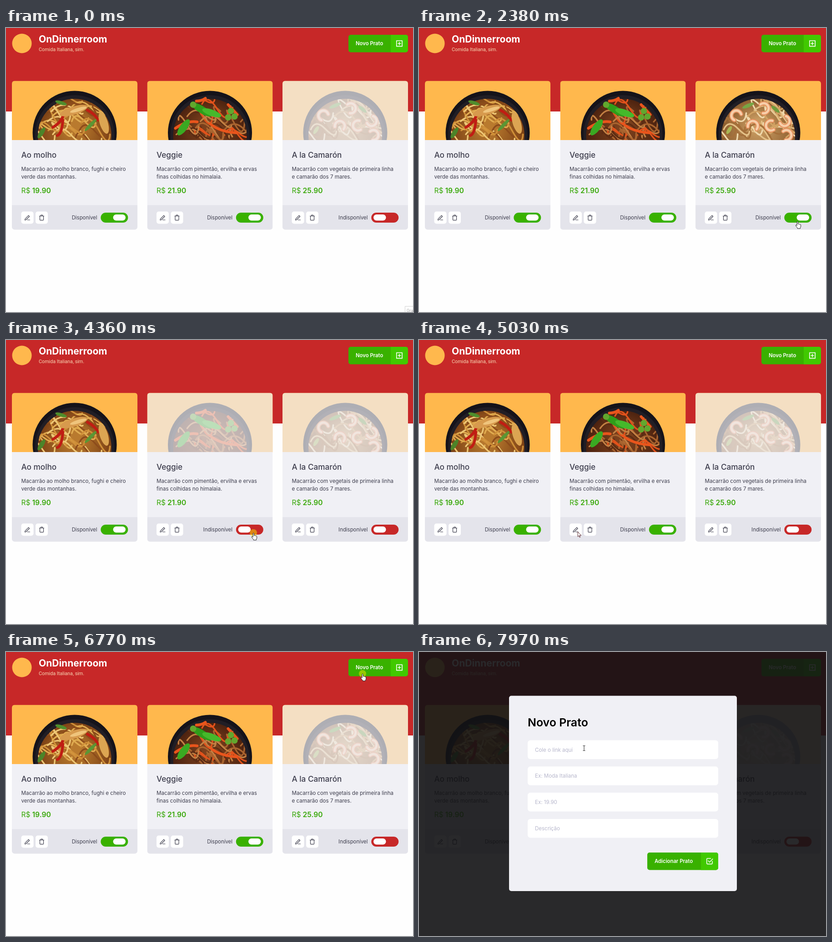
An HTML page with a canvas for the animation above (8 s loop, 895 px wide and 626 px high).

```html
<!DOCTYPE html>
<html lang="pt">
<head>
<meta charset="utf-8">
<title>Novo Prato</title>
<style>
  html, body { margin: 0; width: 100%; height: 100%; overflow: hidden; background: #fefefe; }
  canvas { display: block; }
</style>
</head>
<body>
<canvas id="stage" width="895" height="626"></canvas>
<script>
const ctx = document.getElementById('stage').getContext('2d');
const LOOP = 8000, TICK = 132.4, FADE = 300;
const RED = [199, 40, 40], GREEN = [57, 177, 0];
const LIGHT = '#41c900', PANEL = '#f0f0f5', INK = '#3d3d4d';

const dishes = [
  { x: 13, name: 'Ao molho', price: '19.90', open: true, flips: [5230, 5880],
    text: ['Macarrão ao molho branco, fughi e cheiro', 'verde das montanhas.'],
    base: ['#b97a2e', '#7a3f14'], noodles: ['#e0ab50', '#cf8f38', '#8d4c1b', '#edc675'], garnish: drawChicken },
  { x: 310.5, name: 'Veggie', price: '21.90', open: true, flips: [3620, 4400],
    text: ['Macarrão com pimentão, ervilha e ervas', 'finas colhidas no himalaia.'],
    base: ['#7d411d', '#4a210f'], noodles: ['#a9642f', '#c28043', '#5c2b13', '#e2521b'], garnish: drawPeppers },
  { x: 608, name: 'A la Camarón', price: '25.90', open: false, flips: [1900, 2930],
    text: ['Macarrão com vegetais de primeira linha', 'e camarão dos 7 mares.'],
    base: ['#c79a60', '#8a5a2c'], noodles: ['#e3bf86', '#d2a263', '#a46f3a', '#f0d9ad'], garnish: drawShrimp }
];

// tick, x, y, shape
const pointer = [
  [7, 886, 600, arrow], [10, 836, 436, arrow], [11, 832, 428, arrow], [12, 832, 426, hand],
  [22, 832, 426, hand], [23, 790, 431, arrow], [24, 733, 431, arrow], [26, 544, 425, hand],
  [35, 544, 425, hand], [36, 536, 430, arrow], [39, 255, 419, hand], [45, 255, 419, hand],
  [46, 273, 422, arrow], [48, 767, 102, arrow], [49, 784, 47, hand], [52, 784, 48, arrow],
  [53, 784, 48, arrow], [54, 620, 105, arrow], [55, 458, 163, arrow], [56, 405, 190, arrow],
  [57, 371, 212, beam], [59, 371, 212, beam], [60, 363, 212, beam]
];
const pressed = [21, 22, 33, 44, 51];
const MODAL_TICK = 52;

const mix = (a, b, p) => a + (b - a) * p;
const clamp = v => Math.min(1, Math.max(0, v));
const easeOut = v => 1 - (1 - clamp(v)) ** 2.2;
const blend = (a, b, p) => `rgb(${a.map((v, i) => Math.round(mix(v, b[i], p)))})`;

function seeded(seed) {
  return () => (seed = (seed * 16807) % 2147483647) / 2147483647;
}

function box(x, y, w, h, r, fill) {
  ctx.beginPath();
  ctx.roundRect(x, y, w, h, r);
  ctx.fillStyle = fill;
  ctx.fill();
}

function disc(x, y, r, fill) {
  ctx.beginPath();
  ctx.arc(x, y, r, 0, Math.PI * 2);
  ctx.fillStyle = fill;
  ctx.fill();
}

function label(str, x, y, size, color, weight = 400, align = 'left', family = 'Inter') {
  ctx.font = `${weight} ${size}px ${family}, sans-serif`;
  ctx.textAlign = align;
  ctx.fillStyle = color;
  ctx.fillText(str, x, y);
}

function line(path, color, width) {
  ctx.strokeStyle = color;
  ctx.lineWidth = width;
  ctx.lineCap = ctx.lineJoin = 'round';
  ctx.stroke(new Path2D(path));
}

function at(x, y, draw) {
  ctx.save();
  ctx.translate(x, y);
  draw();
  ctx.restore();
}

function piece(x, y, rx, ry, angle, fill) {
  ctx.beginPath();
  ctx.ellipse(x, y, rx, ry, angle, 0, Math.PI * 2);
  ctx.fillStyle = fill;
  ctx.fill();
}

// Garnish is placed relative to the bowl centre.
function drawChicken() {
  line('M-48 -12Q-28 -24 -24 -42M-38 6Q-28 2 -26 -28M28 -50Q44 -42 52 -28', '#c01d13', 6);
  piece(-2, -49, 32, 9, -0.3, '#d79a4d');
  piece(8, -51, 19, 4, -0.3, '#efc47c');
  piece(64, -22, 9, 25, -0.3, '#dca552');
  piece(-30, -66, 13, 4, 0.3, '#4f8d2c');
  piece(35, -17, 18, 4, -0.8, '#5b9634');
  piece(-73, 0, 14, 5, -1, '#4c8429');
}

function drawPeppers() {
  line('M-76 -10Q-50 -28 -28 -24M0 -20Q22 -2 58 0M-30 -70Q-18 -70 -10 -76M40 -62L60 -40', '#e9551c', 6);
  piece(-18, -51, 26, 8, 0.55, '#2f9d1a');
  piece(4, -44, 22, 7, 0.35, '#45b92b');
  piece(-58, -12, 21, 8, -0.95, '#3aa922');
  for (const [x, y] of [[46, -48], [54, -36], [40, -34], [-37, -62]]) disc(x, y, 7, '#62a72e');
}

function drawShrimp() {
  ctx.lineCap = 'round';
  for (const [x, y, turn] of [[-48, -38, 2], [12, -54, 4], [58, -26, 5], [28, -16, 1], [-12, -15, 3], [62, 5, 4]]) {
    for (const [color, width] of [['#e58f5d', 9], ['#f7cfaa', 5]]) {
      ctx.beginPath();
      ctx.arc(x, y, 11, turn, turn + 4);
      ctx.strokeStyle = color;
      ctx.lineWidth = width;
      ctx.stroke();
    }
  }
  piece(-22, -60, 14, 4, -0.4, '#77a544');
  piece(38, -52, 11, 4, 0.7, '#6f9c3e');
  piece(-64, -6, 10, 4, -1, '#a9b653');
}

function bowl(dish) {
  const random = seeded(Math.round(dish.x * 91));
  disc(0, 0, 92.5, '#15131a');
  disc(0, 4, 87, '#211e25');
  const glow = ctx.createRadialGradient(0, -18, 12, 0, 4, 82);
  dish.base.forEach((c, i) => glow.addColorStop(i, c));
  ctx.save();
  disc(0, 6, 81, glow);
  ctx.clip();
  for (let i = 0; i < 30; i++) {
    const x = mix(-78, 68, random()), y = mix(-68, 16, random());
    const bend = mix(-32, 32, random());
    line(`M${x} ${y}q${bend} -24 ${bend + 22} ${mix(-12, 18, random())}t24 ${bend / 2}`,
      dish.noodles[i % 4], 3.4);
  }
  ctx.restore();
  dish.garnish();
}

function isOpen(dish, time) {
  return dish.flips.filter(f => time >= f).length % 2 ? !dish.open : dish.open;
}

function openness(dish, time, duration) {
  const last = dish.flips.filter(f => time >= f).pop();
  const open = isOpen(dish, time);
  if (last === undefined) return +open;
  const p = easeOut((time - last) / duration);
  return open ? p : 1 - p;
}

function iconButton(x, path) {
  box(x, 404.5, 27, 27, 5, '#fff');
  at(x + 13.5, 418, () => line(path, INK, 1.2));
}

function toggle(x, p) {
  box(x, 407, 60, 22, 11, blend(RED, GREEN, p));
  box(x + 4.8 + 22.4 * p, 411, 27.5, 13.5, 6.75, '#fff');
}

function card(dish, time) {
  const { x } = dish;
  ctx.save();
  ctx.beginPath();
  ctx.roundRect(x, 116.5, 276, 328, 6);
  ctx.clip();
  box(x, 116.5, 276, 131, 0, '#ffb84d');
  at(x + 138, 231, () => bowl(dish));
  ctx.globalAlpha = 0.7 * (1 - openness(dish, time, FADE));
  box(x, 116.5, 276, 131, 0, PANEL);
  ctx.globalAlpha = 1;
  box(x, 247, 276, 144, 0, PANEL);
  box(x, 390.5, 276, 55, 0, '#e4e4eb');
  ctx.restore();

  label(dish.name, x + 20.5, 285.5, 17.2, INK, 500);
  dish.text.forEach((row, i) => label(row, x + 20.5, 314.5 + 17 * i, 11.6, INK));
  label('R$', x + 20.5, 364, 15.6, '#39a80a');
  label(dish.price, x + 44.5, 364, 15.6, '#39a80a', 600);
  iconButton(x + 20.5, 'M0 5H5.5M2.5 -4.8L4.6 -2.7L-3.2 5L-5.5 5.4L-5 2.8Z');
  iconButton(x + 52, 'M-5 -3.5H5M-2 -3.5V-5.6H2V-3.5M-4 -3.5V4.6Q-4 5.7 -3 5.7H3Q4 5.7 4 4.6V-3.5');
  label(isOpen(dish, time) ? 'Disponível' : 'Indisponível', x + 187.5, 422, 11.4, INK, 400, 'right');
  toggle(x + 195.3, openness(dish, time, 280));
}

function actionButton(x, y, w, split, str, iconPath) {
  box(x, y, w, 38.5, 5, blend(RED, GREEN, 1));
  box(x + split, y, w - split, 38.5, [0, 5, 5, 0], LIGHT);
  label(str, x + 16, y + 23.2, 11.3, '#fff', 600);
  at(x + (split + w) / 2, y + 19.2, () => line(iconPath, '#fff', 1.6));
}

function page(time) {
  box(0, 0, 895, 626, 0, '#fefefe');
  box(0, 0, 895, 184, 0, blend(RED, RED, 0));
  disc(35, 34, 21.5, '#ffb84d');
  label('OnDinnerroom', 72, 31.5, 21, '#fff', 700);
  label('Comida Italiana, sim.', 72, 51, 10.75, '#f7d9b5', 400, 'left', 'Roboto');
  actionButton(753, 15, 131, 93, 'Novo Prato', 'M-6.2 -6.2H6.2V6.2H-6.2ZM-3 0H3M0 -3V3');
  dishes.forEach(dish => card(dish, time));
}

function modal() {
  box(0, 0, 895, 626, 0, 'rgba(18,18,20,.9)');
  box(198, 96.5, 501, 430.5, 5, PANEL);
  label('Novo Prato', 239, 163.5, 24.9, '#000', 600);
  ['Cole o link aqui', 'Ex: Moda Italiana', 'Ex: 19.90', 'Descrição'].forEach((hint, i) => {
    const y = 194.5 + 57.8 * i;
    box(239, y, 419, 41.5, 6, '#fff');
    label(hint, 255, y + 25, 11.5, '#b7b7cc');
  });
  actionButton(502, 442, 156, 118, 'Adicionar Prato',
    'M6 0V4.6Q6 6.2 4.6 6.2H-4.8Q-6.2 6.2 -6.2 4.6V-4.8Q-6.2 -6.2 -4.8 -6.2H2.5M-3 -1L0 2L6.8 -5');
}

function outlined(path, color) {
  const shape = new Path2D(path);
  ctx.fillStyle = '#fff';
  ctx.fill(shape);
  line(path, color, 1);
}

function arrow() {
  outlined('M.5 .5V10.8L2.9 8.6L4.5 12.4L6 11.8L4.4 8.1H7.6Z', '#5c2a30');
}

function hand() {
  outlined('M-1 9V1.8Q-1 .5 .2 .5T1.4 1.8V6.2Q2.8 5 3.7 6.6Q5 5.5 5.8 7.1Q7.6 6.5 7.6 8.5' +
    'V11Q7.6 13 6.4 14.2V16H.2V14.6Q-2.2 12.4 -3.8 9.2Q-3.4 7 -1 9Z', '#222');
}

function beam() {
  line('M-2 -5.5H-.8L0 -4.8L.8 -5.5H2M0 -4.8V4.8M-2 5.5H-.8L0 4.8L.8 5.5H2', '#222', 1);
}

function drawPointer(tick) {
  const i = pointer.findLastIndex(key => key[0] <= tick);
  if (i < 0) return;
  const [k, x, y, shape] = pointer[i];
  const next = pointer[i + 1] || [k + 1, x, y];
  const p = clamp((tick - k) / (next[0] - k));
  const px = mix(x, next[1], p), py = mix(y, next[2], p);
  if (pressed.includes(tick)) disc(px, py, 8, 'rgba(245,225,0,.5)');
  at(px, py, shape);
}

function tooltip(tick) {
  ctx.globalAlpha = 1 - clamp((tick - 3) / 4);
  box(877.5, 613.5, 24, 18, 0, '#fff');
  ctx.strokeStyle = '#d2d2d2';
  ctx.lineWidth = 1;
  ctx.stroke();
  label('Gra', 881, 625.5, 8.5, '#aaa');
  ctx.globalAlpha = 1;
}

function render(now) {
  const tick = Math.floor((now % LOOP + 10) / TICK);
  page(tick * TICK);
  tooltip(tick);
  if (tick >= MODAL_TICK) modal();
  drawPointer(tick);
  requestAnimationFrame(render);
}

requestAnimationFrame(render);
</script>
</body>
</html>
```
